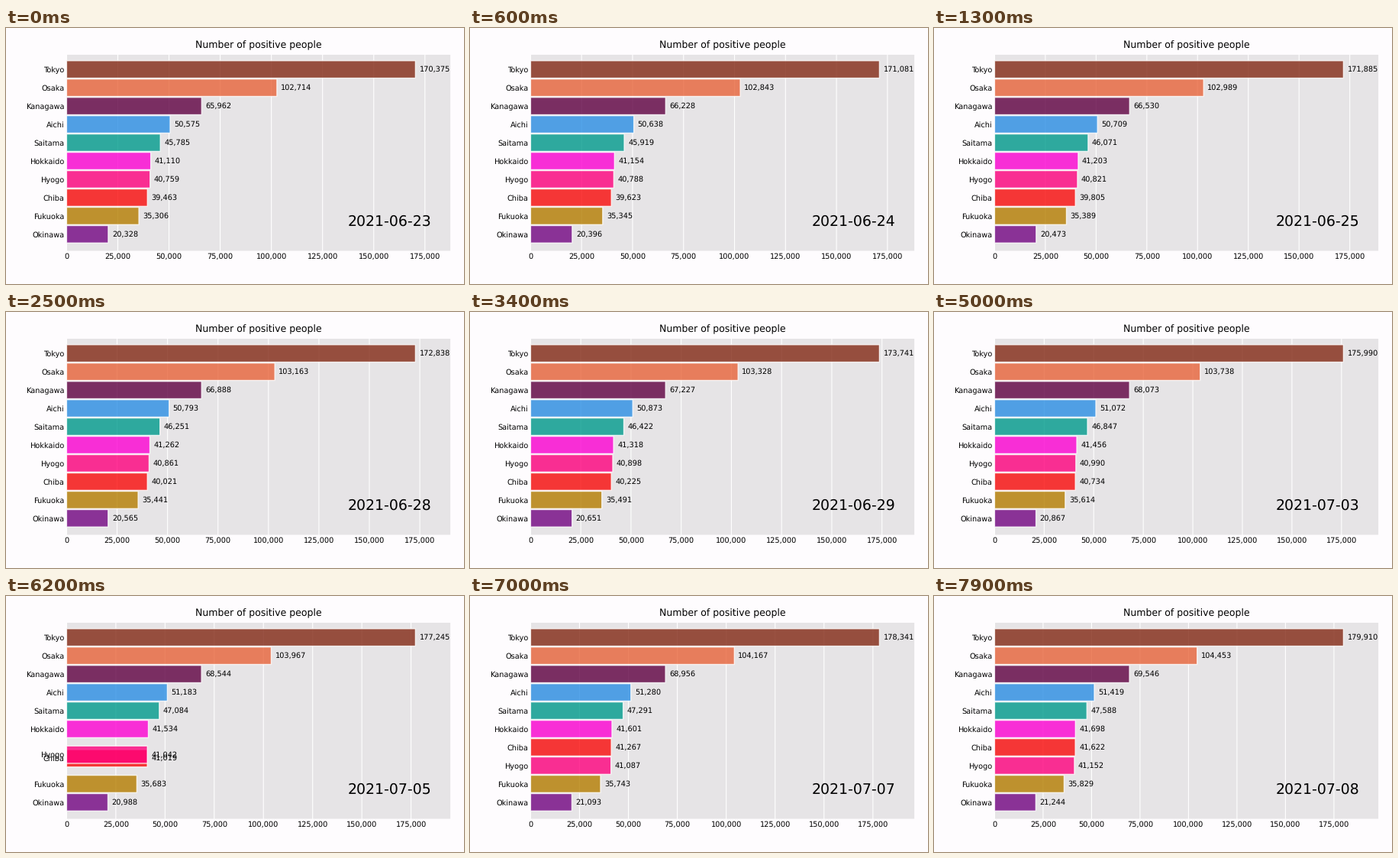
These frames come from a looping animation (600x335 px, 8 s). A matplotlib script:

```python
import numpy as np
import matplotlib.pyplot as plt
from matplotlib.animation import FuncAnimation
from matplotlib.ticker import MultipleLocator, StrMethodFormatter

W, H, DPI = 600, 335, 100
STEPS, FRAMES = 5, 80  # frames per day, frames per loop
LAST = (FRAMES - 1) / STEPS
START = np.datetime64("2021-06-23")

# Soft subpixel look: no hinted glyphs, no snapped edges
plt.rcParams.update({"font.family": "DejaVu Sans",
                     "text.hinting": "none",
                     "path.snap": False})

# Name, color, first and last total; listed back to front
REGIONS = [
    ("Hokkaido", "#fd00d2", 41110, 41698),
    ("Saitama", "#009b8c", 45785, 47588),
    ("Chiba", "#fa0a0a", 39463, 41622),
    ("Tokyo", "#822814", 170375, 179910),
    ("Kanagawa", "#5f0041", 65962, 69546),
    ("Aichi", "#2a8ee4", 50575, 51419),
    ("Osaka", "#e8643a", 102714, 104453),
    ("Hyogo", "#ff007d", 40759, 41152),
    ("Fukuoka", "#b47d00", 35306, 35829),
    ("Okinawa", "#730582", 20328, 21244),
]
NAMES, COLORS, FIRST, FINAL = zip(*REGIONS)
FIRST, FINAL = np.array(FIRST), np.array(FINAL)


def growth(t):
    """Rising case count with a weekly dip around Monday."""
    return t + 0.023 * t**2 - 0.425 * np.sin(2 * np.pi * (t - 4.5) / 7)


def totals(t):
    share = (growth(t) - growth(0)) / (growth(LAST) - growth(0))
    return FIRST + (FINAL - FIRST) * share


def day_ranks(day):
    """Rank per region, 1 for the smallest total."""
    return np.argsort(np.argsort(totals(day))) + 1


def ranks_at(frame):
    day, step = divmod(frame, STEPS)
    now, then = day_ranks(day), day_ranks(day + 1)
    return now + (then - now) * step / STEPS


fig = plt.figure(figsize=(W / DPI, H / DPI), dpi=DPI, facecolor="#fefcfe")
ax = fig.add_axes([79.4 / W, 43.5 / H, 502.7 / W, 256.5 / H],
                  facecolor="#e6e4e6")
for spine in ax.spines.values():
    spine.set_visible(False)
ax.set_axisbelow(True)
ax.grid(True, axis="x", color="white")
ax.tick_params(length=0, labelsize=7, pad=2)
ax.xaxis.set_major_locator(MultipleLocator(25000))
ax.xaxis.set_major_formatter(StrMethodFormatter("{x:,.0f}"))
ax.set_title("Number of positive people", fontsize=9)

bars = ax.barh(ranks_at(0), FIRST, height=0.95, alpha=0.8,
               color=COLORS, ec="white")
labels = [ax.text(0, 0, "", ha="left", va="center", size=7) for _ in NAMES]
date = ax.text(0.95, 0.15, "", transform=ax.transAxes,
               ha="right", va="center", size=13.6)
ax.set_ylim(0.1, 10.8)


def update(frame):
    ranks, values = ranks_at(frame), totals(frame / STEPS)
    x_max = values.max() * 1.1

    ax.set_xlim(0, x_max)
    ax.set_yticks(ranks, NAMES)
    for bar, label, y, value in zip(bars, labels, ranks, values):
        bar.set_width(value)
        bar.set_y(y - bar.get_height() / 2)
        label.set_position((value + 0.01 * x_max, y))
        label.set_text(f"{value:,.0f}")
    date.set_text(str(START + frame // STEPS))
    return [*bars, *labels, date]


anim = FuncAnimation(fig, update, frames=FRAMES, interval=100,
                     repeat=True, repeat_delay=0, blit=False)
plt.show()
```
